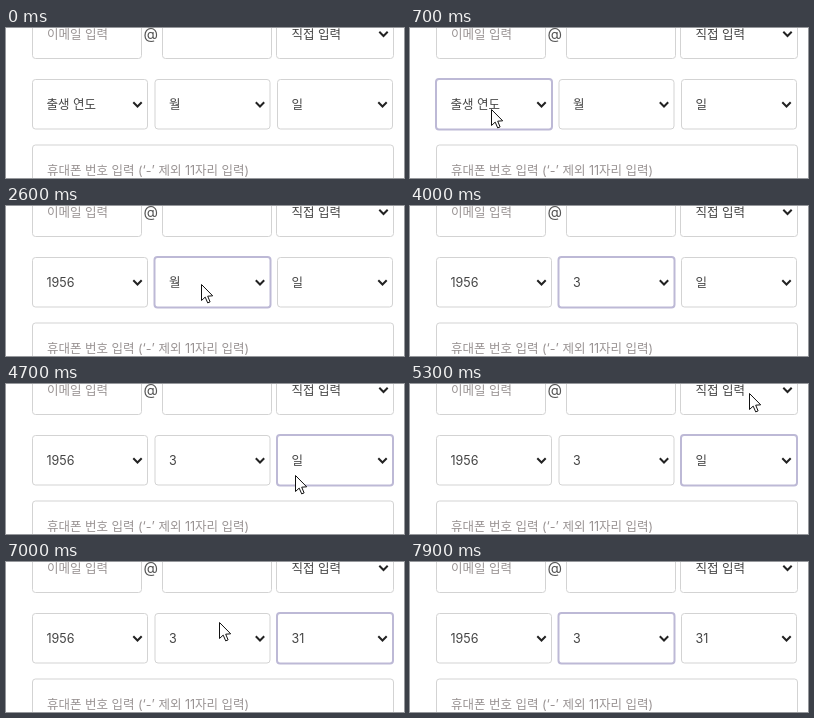
Recreate the animation shown at these times as an HTML page with a canvas. Size 398 by 150 pixels, loop 8000 ms.

```html
<!DOCTYPE html>
<html lang="ko">
<head>
<meta charset="utf-8">
<title>생년월일 입력</title>
<style>
html, body { margin: 0; width: 100%; height: 100%; overflow: hidden; background: #fff; }
canvas { display: block; width: 398px; height: 150px; }
</style>
</head>
<body>
<canvas id="stage" width="398" height="150"></canvas>
<script>
const ctx = document.getElementById('stage').getContext('2d');
const LOOP = 8000, STEP = 100;
const FONT = 'Inter, "Noto Sans CJK KR", "Noto Sans CJK", sans-serif';
const DARK = '#444', MUTED = '#999393', LINE = '#d3d3d3', FOCUS = '#bdb9d6';

// The pointer rests below the stage between visits
const hidden = { x: 218, y: 152 };
const moves = [
  { from: 100, to: 500, x: 81, y: 81 },
  { from: 1200, to: 1600, x: 73, y: -6 },
  { from: 1800, to: 2500, x: 195, y: 78 },
  { from: 2700, to: 3100, ...hidden },
  { from: 4100, to: 4400, x: 289, y: 91 },
  { from: 4900, to: 5300, x: 339, y: 9 },
  { from: 5400, to: 5900, x: 315, y: 40 },
  { from: 6600, to: 7000, x: 213, y: 60 },
  { from: 7000, to: 7200, x: 195, y: 72 },
  { from: 7600, to: 7900, ...hidden }
];

const selects = [
  { hint: '출생 연도', value: '1956', chosen: 1800, focused: t => t >= 700 && t < 2600 },
  { hint: '월', value: '3', chosen: 4000, focused: t => t >= 2600 && t < 4700 || t >= 7300 },
  { hint: '일', value: '31', chosen: 6200, focused: t => t >= 4700 && t < 7300 }
];

const smooth = k => k * k * (3 - 2 * k);

function pointerAt(t) {
  let { x, y } = hidden;
  for (const m of moves) {
    const k = smooth(Math.min(1, Math.max(0, (t - m.from) / (m.to - m.from))));
    x += (m.x - x) * k;
    y += (m.y - y) * k;
  }
  return { x, y };
}

function box(x, y, w, h, focused = false) {
  const grow = focused ? 0.5 : 0;
  ctx.beginPath();
  ctx.roundRect(x + 0.5 - grow, y + 0.5 - grow, w + grow * 2, h + grow * 2, 3);
  ctx.lineWidth = focused ? 2 : 1;
  ctx.strokeStyle = focused ? FOCUS : LINE;
  ctx.stroke();
}

function label(text, x, y, color, size = 12.5) {
  ctx.font = `${size}px ${FONT}`;
  ctx.fillStyle = color;
  ctx.fillText(text, x, y);
}

function chevron(x, y) {
  ctx.beginPath();
  ctx.moveTo(x - 4.2, y - 2.2);
  ctx.lineTo(x, y + 2);
  ctx.lineTo(x + 4.2, y - 2.2);
  ctx.lineWidth = 2;
  ctx.strokeStyle = '#222';
  ctx.stroke();
}

const arrow = new Path2D('M0 0V16L3.7 12.6 6.2 18.4 8.6 17.4 6.2 11.7 11.2 11.3Z');

function drawPointer({ x, y }) {
  ctx.save();
  ctx.translate(Math.round(x) + 0.5, Math.round(y) + 0.5);
  ctx.fillStyle = '#fff';
  ctx.fill(arrow);
  ctx.lineWidth = 1;
  ctx.strokeStyle = '#111';
  ctx.stroke(arrow);
  ctx.restore();
}

function draw(t) {
  ctx.fillStyle = '#fff';
  ctx.fillRect(0, 0, 398, 150);

  box(26, -20, 109, 50);
  box(156, -20, 109, 50);
  box(270, -20, 117, 50);
  label('이메일 입력', 41, 10.5, MUTED);
  label('@', 137.5, 10.5, '#555', 15);
  label('직접 입력', 285.5, 10.5, DARK);
  chevron(377.5, 6);

  selects.forEach(({ hint, value, chosen, focused }, i) => {
    const x = 26 + 122.5 * i;
    box(x, 51, 115, 49.5, focused(t));
    label(t < chosen ? hint : value, x + 14.5, 81, DARK);
    chevron(x + 105.5, 76.5);
  });

  box(26, 116.5, 361, 50);
  label('휴대폰 번호 입력 (‘-’ 제외 11자리 입력)', 41, 146.5, MUTED);

  drawPointer(pointerAt(t));
}

function tick() {
  const t = performance.now() % LOOP;
  draw(Math.floor(t / STEP) * STEP);
  requestAnimationFrame(tick);
}
tick();
</script>
</body>
</html>
```
